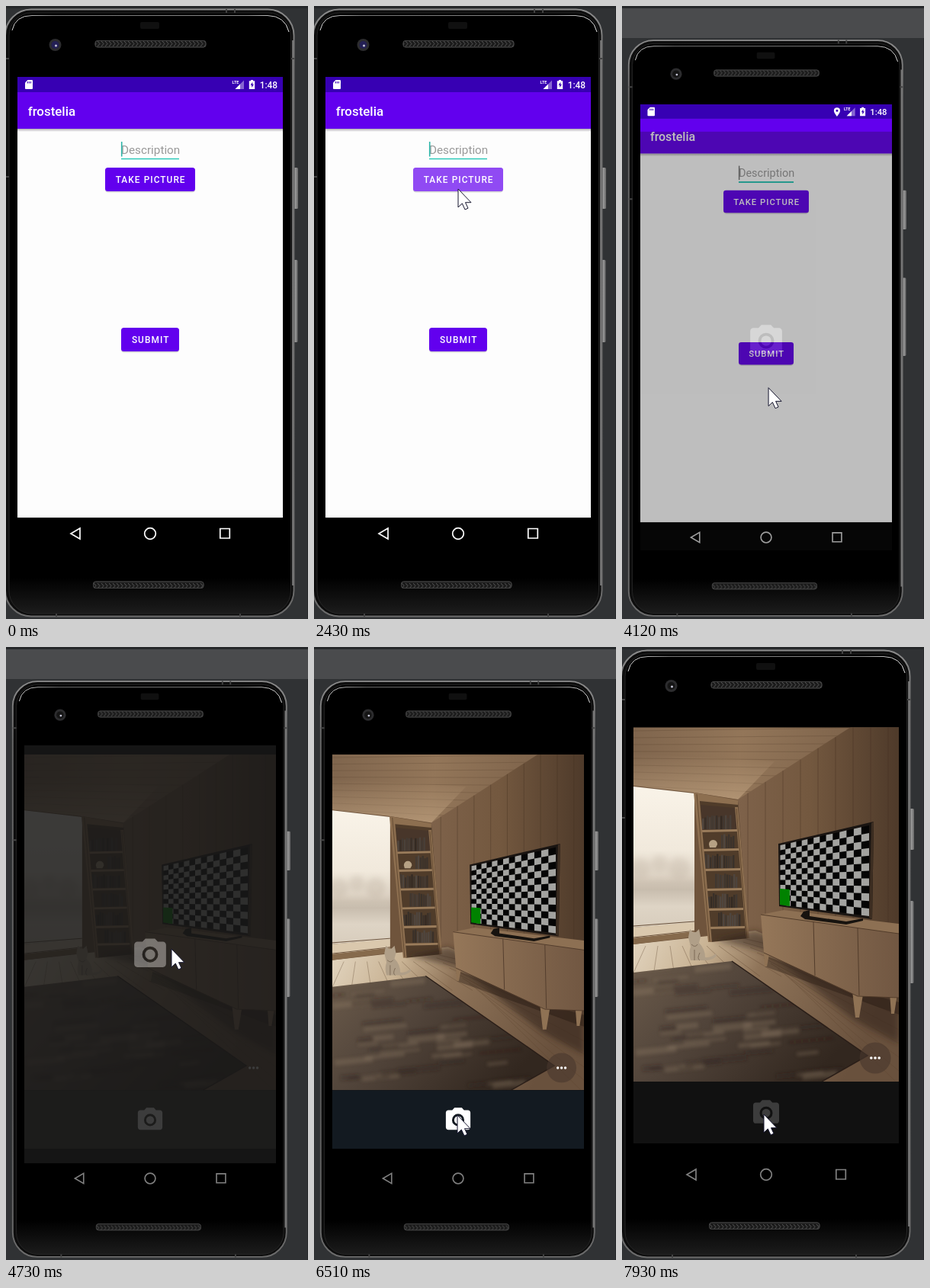
An HTML page that plays this animation: 396x804 px, repeating every 8 s.

```html
<!DOCTYPE html>
<html lang="en">
<head>
<meta charset="utf-8">
<title>Phone camera demo</title>
<style>
html,body{margin:0;width:100%;height:100%;overflow:hidden;background:#303234}
svg{display:block;width:396px;height:804px}
text{font-family:Roboto,"Open Sans",sans-serif}
.btn{font-size:11.86px;font-weight:500;letter-spacing:1.06px;fill:#fff}
</style>
</head>
<body>
<svg viewBox="0 0 396 804" width="396" height="804">
<defs>
  <linearGradient id="rim" x2="0" y2="1"><stop offset="0" stop-color="#8c8c8c"/><stop offset=".1" stop-color="#686868"/><stop offset=".75" stop-color="#5c5c5c"/><stop offset="1" stop-color="#6c6c6c"/></linearGradient>
  <linearGradient id="body" x2="0" y2="1"><stop offset=".94" stop-color="#000"/><stop offset="1" stop-color="#1c1c1c"/></linearGradient>
  <linearGradient id="key"><stop offset="0" stop-color="#555"/><stop offset=".5" stop-color="#9a9a9a"/><stop offset="1" stop-color="#666"/></linearGradient>
  <linearGradient id="shine"><stop offset="0" stop-color="#ddd"/><stop offset=".15" stop-color="#777"/><stop offset=".85" stop-color="#888"/><stop offset="1" stop-color="#eee"/></linearGradient>
  <linearGradient id="drop" x2="0" y2="1"><stop offset="0" stop-color="#000" stop-opacity=".3"/><stop offset="1" stop-color="#000" stop-opacity="0"/></linearGradient>
  <linearGradient id="ceil" x2="1" y2=".2"><stop offset="0" stop-color="#7f654d"/><stop offset=".4" stop-color="#937659"/><stop offset="1" stop-color="#735a44"/></linearGradient>
  <linearGradient id="glow" x2="0" y2="1"><stop offset="0" stop-color="#c9ab88" stop-opacity="0"/><stop offset="1" stop-color="#c9ab88" stop-opacity=".55"/></linearGradient>
  <linearGradient id="wall"><stop offset="0" stop-color="#7e624a"/><stop offset=".45" stop-color="#73583f"/><stop offset="1" stop-color="#4e3a2a"/></linearGradient>
  <linearGradient id="sky" x2="0" y2="1"><stop offset="0" stop-color="#f9f3e8"/><stop offset=".45" stop-color="#f1e9dc"/><stop offset=".66" stop-color="#dcd1c2"/><stop offset=".73" stop-color="#c8bdae"/><stop offset=".85" stop-color="#ded4c5"/><stop offset="1" stop-color="#d8cdbd"/></linearGradient>
  <linearGradient id="floor" x2="1" y2=".3"><stop offset="0" stop-color="#e3d6c1"/><stop offset=".28" stop-color="#c9b394"/><stop offset=".5" stop-color="#8f7459"/><stop offset="1" stop-color="#69513d"/></linearGradient>
  <linearGradient id="rug" x2="1" y2=".5"><stop offset="0" stop-color="#6b5b4b"/><stop offset=".45" stop-color="#51443a"/><stop offset="1" stop-color="#32271f"/></linearGradient>
  <linearGradient id="wood"><stop offset="0" stop-color="#957759"/><stop offset="1" stop-color="#715742"/></linearGradient>
  <pattern id="mesh" width="5" height="9" patternUnits="userSpaceOnUse" patternTransform="translate(0 45)"><path d="M0 1l3 3.5-3 3.5" fill="none" stroke="#555"/></pattern>
  <filter id="soft"><feGaussianBlur stdDeviation="2.2"/></filter>
  <filter id="haze"><feGaussianBlur stdDeviation="4"/></filter>
  <clipPath id="view"><path d="M15 105.6h348V570H15z"/></clipPath>
  <clipPath id="mat"><path d="M15 427L144 412 322 536 262 570H15z"/></clipPath>
  <clipPath id="pane"><path d="M15 183l80 9V362l-80 6z"/></clipPath>
  <clipPath id="screen"><path d="M15 93h348v617H15z"/></clipPath>
  <path id="cam" fill-rule="evenodd" d="M-3-9L-4.8-7H-8c-1.1 0-2 .9-2 2V7c0 1.1.9 2 2 2H8c1.1 0 2-.9 2-2V-5c0-1.1-.9-2-2-2H4.8L3-9zM0 6a5 5 0 1 1 0-10 5 5 0 1 1 0 10zM0 4.2a3.2 3.2 0 1 0 0-6.4 3.2 3.2 0 1 0 0 6.4z"/>
</defs>

<rect width="396" height="804" fill="#303234"/>
<path d="M395.500 3v801" stroke="#27292b"/>
<rect width="396" height="3" fill="#26282a"/>
<rect id="band" y="3" width="396" height="39" fill="#4a4b4d"/>

<g id="device">
  <g fill="url(#key)">
    <rect x="376" y="212" width="7" height="54" rx="1.5"/>
    <rect x="376" y="333" width="6.500" height="108" rx="1.5"/>
  </g>
  <rect x="-1" y="4.500" width="378.500" height="796" rx="34" fill="#0d0d0d" stroke="url(#rim)" stroke-width="2"/>
  <rect x="4" y="9" width="369.500" height="788" rx="30" fill="url(#body)" stroke="#262626"/>
  <path d="M8 32Q12 12.500 34 12.500H343Q366 13 371 34" fill="none" stroke="url(#shine)"/>
  <path d="M376.300 45V760" stroke="#777" stroke-width="2.400"/>
  <path d="M-1 69h5M-1 224h5M374 69h4M289 4v5M300 4v5M66 797v4M307 797v4" stroke="#444" stroke-width="2"/>
  <rect x="176" y="21" width="25" height="9" rx="2" fill="#101010"/>
  <g stroke="#444" stroke-width=".8">
    <rect x="117" y="45.500" width="145" height="8.500" rx="3" fill="#1b1b1b"/>
    <rect x="117" y="45.500" width="145" height="8.500" rx="3" fill="url(#mesh)"/>
    <rect x="114.500" y="755" width="144.500" height="8.500" rx="3" fill="#1b1b1b"/>
    <rect x="114.500" y="755" width="144.500" height="8.500" rx="3" fill="url(#mesh)"/>
  </g>
  <circle cx="64.500" cy="51" r="8" fill="#2c2c2e"/>
  <circle id="lens" cx="64.500" cy="51" r="5"/>
  <circle cx="65.500" cy="52" r="1.500" fill="#c5c5d5"/>

  <g id="form">
    <rect x="15" y="93" width="348" height="578" fill="#fdfdfd"/>
    <rect x="15" y="161" width="348" height="4" fill="url(#drop)"/>
    <rect x="15" y="113" width="348" height="48" fill="#6200ee"/>
    <rect x="15" y="93" width="348" height="20" fill="#3700b3"/>
    <text x="28.700" y="143.700" font-size="16.900" font-weight="500" fill="#fff">frostelia</text>
    <g fill="#fff">
      <path d="M28.500 97H34q1 0 1 1v10q0 1-1 1H26q-1 0-1-1v-7.500z"/>
      <path d="M28.500 99v2.500M30.500 99v2.500M32.500 99v2.500" stroke="#3700b3"/>
      <path d="M312 97.500V109H300.500z" opacity=".4"/><path d="M307 102.500V109H300.500z"/>
      <text x="296.500" y="101.800" font-size="5.500" font-weight="700">LTE</text>
      <path d="M321 97h3v1.200h2.200V109h-7.400V98.200H321z"/>
      <path d="M323.300 99.800l-2.800 4h1.700v3.200l2.800-4.200h-1.700z" fill="#3700b3"/>
      <text x="332.700" y="107.600" font-size="11.900" font-weight="500">1:48</text>
      <path id="pin" fill-rule="evenodd" d="M287 97.500a4.300 4.300 0 0 1 4.300 4.300c0 3-4.300 8-4.300 8s-4.300-5-4.300-8a4.300 4.300 0 0 1 4.300-4.300zm0 2.700a1.600 1.600 0 1 0 0 3.200 1.600 1.600 0 1 0 0-3.200z"/>
    </g>
    <text x="151" y="193.700" font-size="15.250" fill="#999">Description</text>
    <path id="line" d="M151 200.500h76" stroke="#2cc9b8"/>
    <path id="caret" d="M151.700 178v19.500" stroke-width="1.600"/>
    <g fill="#000" opacity=".16"><rect x="130" y="213" width="118" height="31.500" rx="4"/><rect x="151" y="423" width="76" height="31.500" rx="4"/></g>
    <rect x="130" y="212" width="118" height="31" rx="3.500" fill="#6200ee"/>
    <rect id="ripple" x="130" y="212" width="118" height="31" rx="3.500" fill="#fff"/>
    <text class="btn" x="143.800" y="232">TAKE PICTURE</text>
    <rect x="151" y="422" width="76" height="31" rx="3.500" fill="#6200ee"/>
    <text class="btn" x="164.900" y="442">SUBMIT</text>
  </g>

  <g id="camera">
    <rect x="15" y="93" width="348" height="578"/>
    <g clip-path="url(#view)">
      <rect x="15" y="105" width="348" height="465" fill="url(#ceil)"/>
      <g id="beams" stroke="#503a28" stroke-width=".7" opacity=".35"></g>
      <path d="M15 140L200 150 152 200 95 191 15 182z" fill="url(#glow)"/>
      <path d="M15 182L95 191 152 200V395H15z" fill="#6f543c"/>
      <path d="M152 200L300 105h63V500L152 380z" fill="url(#wall)"/>
      <g id="planks" stroke="#402d1f" stroke-width=".8" opacity=".45"></g>
      <path d="M15 390L175 372 363 450V570H15z" fill="url(#floor)"/>
      <g id="boards" stroke="#5d452f" stroke-width=".8" opacity=".45"></g>
      <path d="M15 183l80 9V362l-80 6z" fill="url(#sky)"/>
      <g clip-path="url(#pane)"><g fill="#b8ab9b" opacity=".3" filter="url(#haze)"><circle cx="24" cy="290" r="13"/><circle cx="49" cy="284" r="11"/><circle cx="75" cy="290" r="14"/><path d="M10 304h90v10H10z"/></g></g>
      <path d="M15 368l80-7v13l-80 8z" fill="#dac8ad"/><path d="M15 382l80-9v7l-80 10z" fill="#866a4c"/>
      <path d="M15 366l80-6M15 381l82-9" stroke="#69503a" fill="none"/>
      <path d="M95 192l57 10 14 180-49 5z" fill="#503c2a"/>
      <path d="M103 207l45 4 3 29-45 1z" fill="#48362a"/>
      <g id="shelves"></g>
      <path d="M94 191l7 1 17 195h-5zM148 210h4l15 172h-4zM94 191l58 10v6l-50-5z" fill="#8d6f50"/>
      <path d="M98 193l17 193M150 212l14 170" stroke="#584029" stroke-width=".8"/>
      <path d="M114 259c0-8 11-8 11 0l-2 4h-8z" fill="#b6a184"/>
      <path d="M190 400L120 384 175 372 363 452V520L305 490z" fill="#2b1d13" opacity=".5" filter="url(#haze)"/>
      <path d="M15 427L144 412 322 536 262 570H15z" fill="url(#rug)"/>
      <g clip-path="url(#mat)"><g id="streaks" filter="url(#soft)"></g></g>
      <path d="M144 412L322 536 262 570" fill="none" stroke="#2a1e18" stroke-width="1.500"/>
      <path d="M90 411q-3-9 0-18l-3-12 2-11 4 4h4l4-4 2 10-2 8q8 8 8 19 8 1 14-5l1 3q-6 7-17 6H92z" fill="#b09f88"/>
      <path d="M91 390q5 5 8 0M95 397v14M102 401q-4 8 0 10" fill="none" stroke="#7d6b57"/>
      <path d="M192 406l115 44 56 16v16L187 419z" fill="#1e130c" opacity=".35"/>
      <path d="M186 400l7 3-3 16h-3zM302 451l14 5-5 30h-5zM351 454l10 1-4 26h-4z" fill="#8f7254"/>
      <path d="M182 351l30-6 151 18v14z" fill="#8d7053"/>
      <path d="M182 351l181 25v84l-54-2-123-57z" fill="url(#wood)"/>
      <path d="M182 351l181 25M251 361l2 70M309 369l2 88M186 401l123 57 54 2" fill="none" stroke="#4d3828" stroke-width=".9"/>
      <path d="M238 347l8-2v8l48 7 22-4v3l-22 5-54-7-6-4z" fill="#17130f"/>
      <path d="M205 258l125-29-2 128-122-17z" fill="#1a1512"/>
      <path d="M327 231l3-2-2 128-4-2z" fill="#3c2d21"/>
      <g id="tv"></g>
      <path d="M207 317l13 1v22l-13-2z" fill="#008200"/>
    </g>
    <rect id="bar" x="15" y="570" width="348" height="81"/>
    <use id="shutter" href="#cam" transform="translate(189 609.500) scale(1.700)"/>
    <g fill="#fff"><circle id="disc" cx="332" cy="539" r="20.500" fill="#49382e"/><circle cx="326.800" cy="539" r="1.800"/><circle cx="332" cy="539" r="1.800"/><circle cx="337.200" cy="539" r="1.800"/></g>
  </g>

  <g id="nav" fill="none" stroke="#fff" stroke-width="1.700">
    <path d="M97 685v14l-12-7zM280.800 685.500h12.500V698h-12.500z"/><circle cx="189" cy="692" r="7.300"/>
  </g>
  <g clip-path="url(#screen)">
    <g id="splash"><rect id="sheet" x="15" y="93" width="348" fill="#191919"/><use href="#cam" fill="#757575" transform="translate(189 380) scale(2.200)"/></g>
  </g>
</g>
<path id="cursor" d="M0 0V24L5.300 19 9 27 13 25.200 9.500 17.700H17z" fill="#fff" stroke="#15152e" stroke-width="1"/>
</svg>

<script>
const $ = id => document.getElementById(id);
const LOOP = 8000;
let seed = 7;
const rnd = () => (seed = seed * 16807 % 2147483647) / 2147483647;
const lerp = (a, b, p) => a + (b - a) * p;
const add = (id, d, attrs = {}) => {
  const el = document.createElementNS('http://www.w3.org/2000/svg', 'path');
  el.setAttribute('d', d);
  for (const k in attrs) el.setAttribute(k, attrs[k]);
  $(id).append(el);
};

function buildRoom() {
  for (let i = 0; i < 9; i++) {
    add('beams', `M15 ${110 + i * 9}L${300 - i * 16} ${106 + i * 10.5}`);
    const x = 165 + i * 23;
    add('planks', `M${x} ${Math.max(105, 200 - (x - 152) * .64)}V${380 + i * 10}`);
    add('boards', `M${15 + i * 16} 392l${-30 + i * 12} 40M${150 + i * 9} ${380 + i * 7}L363 ${430 + i * 18}`);
  }
  const rows = [240, 265, 291, 317, 343, 367];
  rows.forEach((y, r) => {
    const left = 105 + r * 2, right = 149 + r * 2;
    for (let x = left + (r % 2) * 11; x < right - 5; x += 3) {
      if (r === 1 && x < 128) continue;
      const h = 14 + rnd() * 5, c = 38 + rnd() * 32 | 0;
      add('shelves', `M${x} ${y - 1}v${-h}h2.400v${h}z`, {fill: `rgb(${c + 12},${c + 3},${c - 4})`});
    }
    add('shelves', `M${left - 1} ${y}L${right + 2} ${y - 1}v3L${left - 1} ${y + 3}z`, {fill: '#9a7c5b'});
  });
  for (let i = 0; i < 50; i++) {
    const x = rnd() * 240, y = 420 + rnd() * 145, w = 20 + rnd() * 40;
    add('streaks', `M${x} ${y}l${w} ${-w * .1}`, {
      stroke: i % 2 ? '#94816a' : '#30261f', 'stroke-width': 3 + rnd() * 6, opacity: .3
    });
  }
}

// Checkerboard in perspective on the television
function buildScreen(cols, rows) {
  const at = (c, r) => {
    const s = c / cols, u = s / (1.25 - .25 * s), v = r / rows;
    const top = lerp(260, 234, u), bottom = lerp(338, 353, u);
    return `${lerp(207.5, 324, u).toFixed(1)} ${lerp(top, bottom, v).toFixed(1)}`;
  };
  let light = '';
  for (let c = 0; c < cols; c++)
    for (let r = c % 2; r < rows; r += 2)
      light += `M${at(c, r)}L${at(c + 1, r)} ${at(c + 1, r + 1)} ${at(c, r + 1)}z`;
  add('tv', `M${at(0, 0)}L${at(cols, 0)} ${at(cols, rows)} ${at(0, rows)}z`, {fill: '#050505'});
  add('tv', light, {fill: '#a3a3a0'});
}

// Rows: time, then values, interpolated between rows
const POINTER = [
  [250, 318, 710], [560, 245, 430], [880, 188, 245], [1340, 188, 245], [1810, 189, 240], [2500, 189, 240],
  [2760, 194, 374], [2830, 194, 374], [3580, 191, 475], [3650, 191, 475], [3850, 192, 501],
  [4120, 192, 501], [4460, 217, 396], [5360, 217, 396], [5960, 190, 612], [6180, 190, 612],
  [6510, 188, 614], [6709, 188, 614], [6710, 201, 366], [7370, 201, 366], [7930, 186, 613]
];
const RIPPLE = [[2010, 0], [2220, .29], [2500, .29], [2630, 0]];
const SPLASH = [
  [4049, 0, 46], [4050, .1, 43], [4120, .27, 38], [4190, .5, 22], [4260, .75, 11], [4330, .95, 4],
  [4460, 1, 0], [4660, 1, 0], [4730, .85, 0], [5220, 0, 0]
];
const NAV = [[2629, 1], [2630, .9], [4050, .9], [4400, .5]];
const DISC = [[5220, 0], [5500, .6]];

function sample(table, t) {
  if (t <= table[0][0]) return table[0].slice(1);
  const i = table.findIndex(row => row[0] > t);
  if (i < 0) return table[table.length - 1].slice(1);
  const a = table[i - 1], b = table[i], p = (t - a[0]) / (b[0] - a[0]);
  return a.slice(1).map((v, k) => lerp(v, b[k + 1], p));
}
const show = (id, on) => $(id).style.display = on ? '' : 'none';
const set = (id, k, v) => $(id).setAttribute(k, v);

function render(t) {
  const small = t >= 2630 && t < 6710;
  const blank = t >= 2630 && t < 2830 || t >= 6710 && t < 7170;
  const located = t >= 2830, live = t >= 4460, frozen = t >= 7170;

  show('band', small);
  set('device', 'transform', small ? 'translate(9.776 40.810) scale(.94828)' : '');
  set('lens', 'fill', t < 2630 ? '#242055' : '#151515');
  show('form', !live && !blank);
  show('camera', live && !blank);
  show('nav', !blank);
  show('pin', located);

  const blink = t >= 350 && t < 850 || t >= 1340 && t < 1810;
  show('caret', !blink);
  set('caret', 'stroke', located ? '#777' : '#2cb5a8');
  set('line', 'stroke-width', located ? 2 : 1.3);
  set('ripple', 'opacity', sample(RIPPLE, t)[0]);

  set('bar', 'fill', t < 5000 ? '#2e2e28' : frozen ? '#111' : '#131a21');
  set('shutter', 'fill', frozen ? '#3c3c3c' : '#fff');
  set('disc', 'opacity', sample(DISC, t)[0]);
  set('nav', 'opacity', sample(NAV, t)[0]);

  const [alpha, drop] = sample(SPLASH, t);
  set('splash', 'opacity', alpha);
  set('splash', 'transform', `translate(0 ${drop})`);
  set('sheet', 'height', live ? 578 : 617);

  const [x, y] = sample(POINTER, t);
  show('cursor', t >= 250);
  set('cursor', 'transform', `translate(${x} ${y})`);
}

buildRoom();
buildScreen(14, 12);
const start = performance.now();
function tick() {
  render((performance.now() - start) % LOOP);
  requestAnimationFrame(tick);
}
tick();
</script>
</body>
</html>
```
